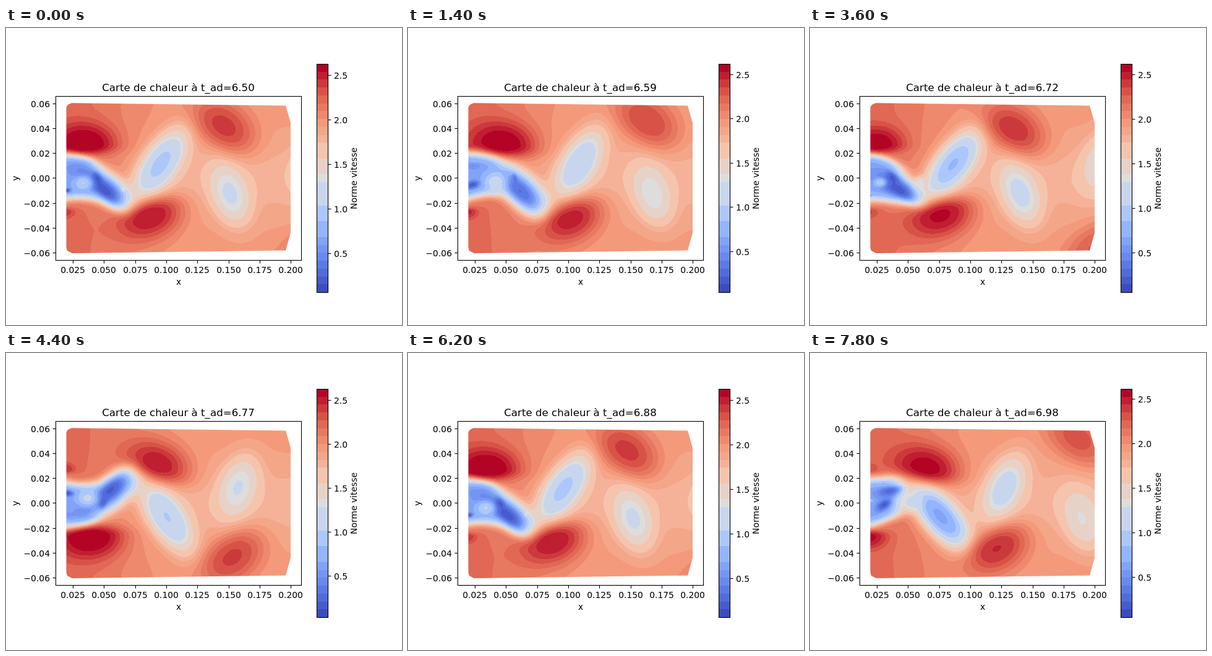
An HTML page with a canvas that plays this animation: 640x480 px, repeating every 8000 ms.

```html
<!DOCTYPE html>
<html lang="fr">
<head>
<meta charset="utf-8">
<style>
html, body { margin: 0; width: 100%; height: 100%; overflow: hidden; background: #fff; }
canvas { display: block; }
</style>
</head>
<body>
<canvas id="stage" width="640" height="480"></canvas>
<script>
const ctx = document.getElementById('stage').getContext('2d');
const STEP_MS = 200, STEPS = 40;
const CYCLES_PER_STEP = 0.16152;   // vortex shedding phase gained per step
const MID = 242.5;                 // wake axis
const FIELD = { x: 97, y: 121, w: 364, h: 244 };
const OUTLINE = [[97.5, 128], [100, 124], [106, 121.3], [452, 125.5], [460, 153],
                 [460, 331], [452, 359.5], [107, 364], [99, 360], [97.5, 355]];

const clamp = (v, lo = 0, hi = 1) => Math.max(lo, Math.min(hi, v));
const sigmoid = z => 1 / (1 + Math.exp(-z));
const bell = z => Math.exp(-z * z);
const life = (t, from, to) => Math.sin(Math.PI * clamp((t - from) / (to - from)));

// Colours: coolwarm in equal bands, with the pale bands merged into wider ones
const WARM = [[59, 76, 192], [98, 130, 234], [141, 176, 254], [184, 208, 249], [221, 221, 221],
              [245, 196, 173], [244, 154, 123], [222, 96, 77], [180, 4, 38]];
const BANDS = 29;
const MERGED = [[7, 8], [9, 10], [11, 13], [15, 16], [17, 18]];
const palette = Array.from({ length: BANDS }, (_, band) => {
  const [first, last] = MERGED.find(([a, b]) => band >= a && band <= b) || [band, band];
  const pos = (first + last) / 2 / (BANDS - 1) * (WARM.length - 1);
  const i = Math.min(Math.floor(pos), WARM.length - 2);
  return WARM[i].map((c, k) => Math.round(c + (WARM[i + 1][k] - c) * (pos - i)));
});

// Each blob follows its age t in cycles. Off is its distance from the wake axis,
// long the radius along its tilt, inner and outer the radii across it.
function fastBlob(t) {
  const old = clamp(t), size = .3 + .7 * sigmoid((t + .15) / .07);
  return {
    x: Math.max(94, 125 + 197 * t + 30 * t * t),
    off: 54 + 30 * Math.max(0, t) ** 2,
    value: 1.02 + Math.min(.2 * t, -.11 * t),
    long: 58 * size,
    inner: (18 + 18 * old) * size,
    outer: 39 * size,
    tilt: -.62 * old
  };
}

function slowBlob(t) {
  const old = clamp(t), grown = sigmoid((t + .15) / .05), size = .2 + .8 * grown;
  const across = (27 + 4 * old) * size;
  return {
    x: 159 + 160 * t + 43 * t * t,
    off: 20 + 5 * old,
    value: .05 + .27 * (1 - bell(t / .36)) + .15 * t,
    long: (51 + 16 * bell((t - .4) / .35)) * size,
    inner: across,
    outer: across * (.65 + .35 * clamp(t / .3)),
    tilt: .68 * grown + .57 * old
  };
}

function backflowBlob(t) {
  const size = life(t, -.25, .55), across = (14 + 12 * t) * size;
  return { x: 125 + 130 * t, off: 8 - 100 * t * t, value: .38 + .27 * t,
           long: 18 * size, inner: across, outer: across, tilt: 0 };
}

function stallBlob(t) {
  const size = life(t, -.15, .8);
  return { x: 98 + 30 * t + 140 * t * t, off: 20 - 80 * t + 75 * t * t,
           value: .06 + .5 * Math.max(0, t - .5),
           long: 14 * size, inner: 8 * size, outer: 8 * size, tilt: -2 * t };
}

// The two sides of the wake mirror each other half a cycle apart
function blobs(shape, phase, side) {
  const list = [];
  for (const [flip, delay] of [[side, 0], [-side, .5]]) {
    for (let t = (phase + delay) % 1 - 1; t < 2; t++) {
      const blob = shape(t);
      if (blob.long > 1) {
        list.push({ ...blob, flip, cos: Math.cos(blob.tilt), sin: Math.sin(blob.tilt) });
      }
    }
  }
  return list;
}

function blend(v, list, x, y) {
  for (const p of list) {
    const dx = x - p.x, dy = p.flip * (y - MID) - p.off;
    const across = dy * p.cos - dx * p.sin;
    const u = (dx * p.cos + dy * p.sin) / p.long;
    const w = across / (across > 0 ? p.outer : p.inner);
    const q = u * u + w * w;
    if (q < 5) v += (p.value - v) * Math.exp(-(q ** 1.3));
  }
  return v;
}

const layer = document.createElement('canvas');
layer.width = FIELD.w;
layer.height = FIELD.h;
const layerCtx = layer.getContext('2d');
const pixels = layerCtx.createImageData(FIELD.w, FIELD.h);

function paintField(phase) {
  const list = [
    ...[slowBlob, backflowBlob, stallBlob].flatMap(shape => blobs(shape, phase, 1)),
    ...blobs(fastBlob, phase, -1)
  ];
  for (let i = 0; i < FIELD.w; i++) {
    const x = FIELD.x + i + .5;
    const sway = (4 + .15 * (x - 98)) * Math.sin(2 * Math.PI * (phase - (x - 130) / 200));
    const axis = MID - sway, half = 37 - .12 * (x - 98);
    const outside = .738 + .1 * bell((x - 98) / 115);
    const valley = .07 * sigmoid((x - 190) / 25);
    const reach = sigmoid((147 - x) / 8);
    for (let j = 0; j < FIELD.h; j++) {
      const y = FIELD.y + j + .5;
      const open = outside - valley * bell((y - MID) / 65);
      const core = reach * sigmoid((half - Math.abs(y - axis)) / 4);
      const v = blend(open + (.22 - open) * core, list, x, y);
      const [r, g, b] = palette[clamp(Math.floor(v * BANDS), 0, BANDS - 1)];
      pixels.data.set([r, g, b, 255], 4 * (j * FIELD.w + i));
    }
  }
  layerCtx.putImageData(pixels, 0, 0);
  ctx.save();
  ctx.beginPath();
  OUTLINE.forEach(([x, y]) => ctx.lineTo(x, y));
  ctx.clip();
  ctx.drawImage(layer, FIELD.x, FIELD.y);
  ctx.restore();
}

function text(str, x, y, align = 'center', size = 13.89) {
  ctx.font = size + 'px "DejaVu Sans", sans-serif';
  ctx.textAlign = align;
  ctx.fillText(str, x, y);
}

function upright(str, x, y) {
  ctx.save();
  ctx.translate(x, y);
  ctx.rotate(-Math.PI / 2);
  text(str, 0, 0);
  ctx.restore();
}

function line(x1, y1, x2, y2) {
  ctx.beginPath();
  ctx.moveTo(x1, y1);
  ctx.lineTo(x2, y2);
  ctx.stroke();
}

function paintAxes(title) {
  ctx.strokeRect(80.5, 110.5, 397, 265);
  for (let k = 0; k < 8; k++) {
    const x = Math.round(108 + k * 50.3);
    line(x + .5, 376, x + .5, 380.5);
    text((.025 * (k + 1)).toFixed(3), x, 396);
  }
  for (let k = -3; k <= 3; k++) {
    const y = Math.floor(242.95 - k * 40.1);
    line(75.5, y + .5, 80, y + .5);
    text((k < 0 ? '\u2212' : '') + Math.abs(k * .02).toFixed(2), 71, y + 6, 'right');
  }
  text('x', 279, 415);
  upright('y', 20, 243);
  text(title, 278.5, 102, 'center', 16.67);
}

function paintColorbar(phase) {
  const top = 58, bottom = 427;
  const edge = k => Math.round(bottom - k * (bottom - top) / BANDS);
  palette.forEach((rgb, k) => {
    ctx.fillStyle = `rgb(${rgb})`;
    ctx.fillRect(502, edge(k + 1), 18, edge(k) - edge(k + 1));
  });
  ctx.fillStyle = '#000';
  ctx.strokeRect(502.5, 58.5, 18, 369);
  // The value range breathes twice per cycle
  const high = 75.4 + .8 * Math.cos(4 * Math.PI * phase);
  const low = 360.2 + 8 * ((phase + .485) % .5);
  for (let k = 0; k < 5; k++) {
    const y = Math.floor(low + (high - low) * k / 4);
    line(521, y + .5, 525.5, y + .5);
    text((.5 * (k + 1)).toFixed(1), 530, y + 6, 'left');
  }
  upright('Norme vitesse', 567, 243);
}

function paint(step) {
  const phase = step * CYCLES_PER_STEP % 1;
  ctx.fillStyle = '#fff';
  ctx.fillRect(0, 0, 640, 480);
  paintField(phase);
  ctx.fillStyle = ctx.strokeStyle = '#000';
  ctx.lineWidth = 1.1;
  paintAxes('Carte de chaleur à t_ad=' + (6.502 + .0123 * step).toFixed(2));
  paintColorbar(phase);
}

let shown = -1;
function tick() {
  const step = Math.floor(performance.now() / STEP_MS) % STEPS;
  if (step !== shown) paint(shown = step);
  requestAnimationFrame(tick);
}
tick();
</script>
</body>
</html>
```
